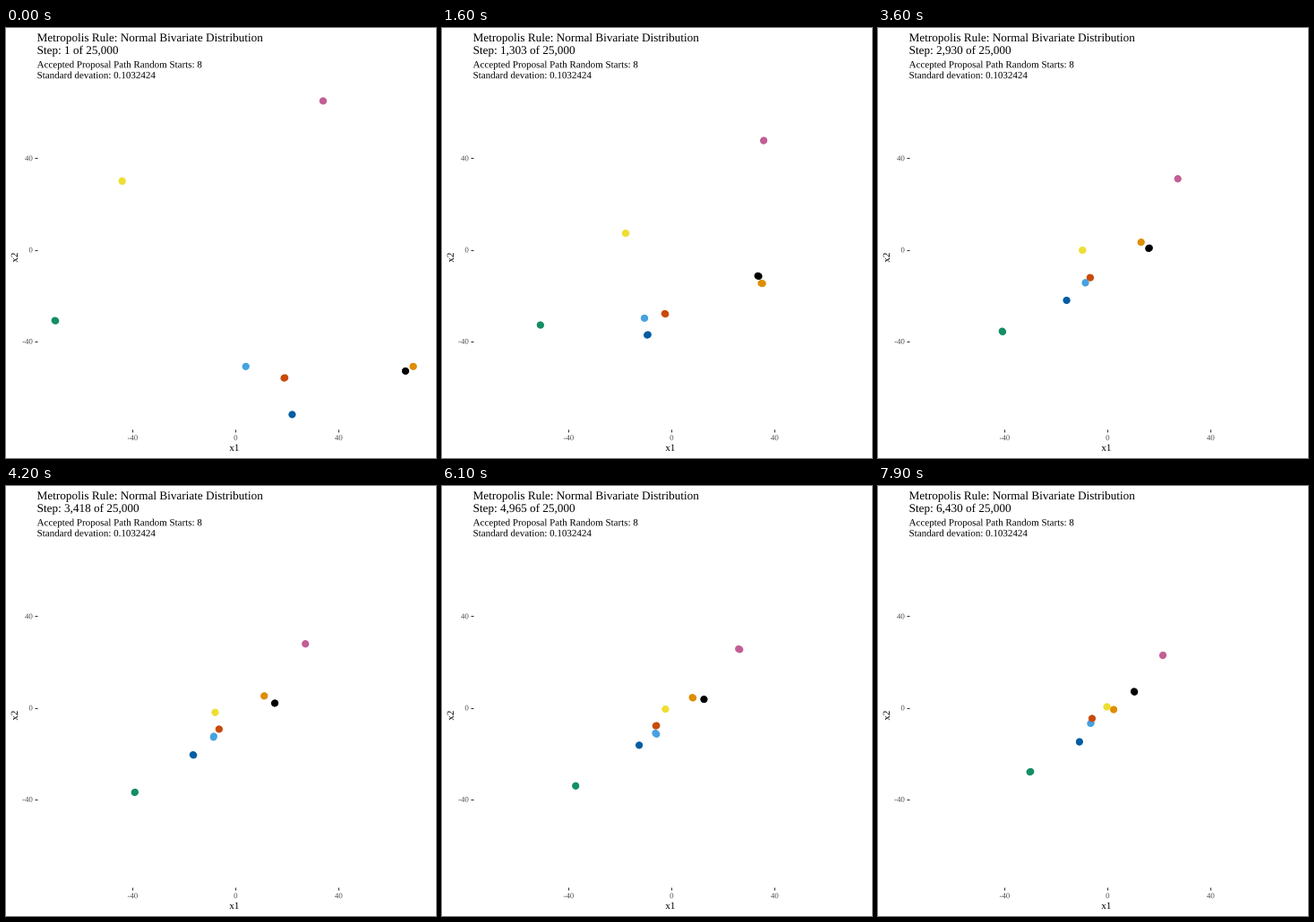
Recreate the animation shown at these times as a matplotlib script. Size 480 by 480 pixels, loop 8000 ms.

```python
import matplotlib.pyplot as plt
import numpy as np
from matplotlib.animation import FuncAnimation
from matplotlib.patches import PathPatch
from matplotlib.textpath import TextPath
from matplotlib.transforms import Affine2D

SIZE, DPI = 480, 80
FRAMES, INTERVAL = 80, 100
STEPS_PER_FRAME = 81.38
PT = 72 / DPI  # points per pixel
ORIGIN = np.array([256.2, 247.5])
SCALE = np.array([2.875, -2.555])  # pixels per data unit

plt.rcParams["font.family"] = "Liberation Serif"

# Each chain drifts steadily, slows down near the mode, then wanders
LEGS = [(0, 16, 1), (16, 49, 2), (49, 79, 1)]  # first, last, ease-out power
CHAINS = {
    "#000000": [(66, -53), (33.7, -11.5), (13.5, 1.8), (10.4, 7)],
    "#DF8D03": [(69, -51), (35.1, -14.7), (10.2, 5.7), (2.4, -0.8)],
    "#46A2E0": [(4, -51), (-10.5, -29.9), (-7.9, -11.9), (-6.5, -6.8)],
    "#148E66": [(-70, -31), (-50.9, -32.9), (-39.5, -37.6), (-30, -28)],
    "#EFDE32": [(-44, 30), (-17.8, 7.2), (-8.6, -1.2), (-0.2, 0.4)],
    "#045DA3": [(22, -72), (-9.3, -37.2), (-16.6, -19), (-10.9, -14.9)],
    "#C94A0A": [(19, -56), (-2.5, -28), (-6.7, -8.8), (-6, -4.7)],
    "#C35F95": [(34, 65), (35.8, 47.7), (25.8, 27.8), (21.5, 22.9)],
}


def to_px(points):
    return ORIGIN + SCALE * np.asarray(points)


def walk(points, rng, sd=0.3):
    """Random walk pinned to the given points at the ends of each leg."""
    path = np.empty((FRAMES, 2))
    for (first, last, power), p, q in zip(LEGS, points, points[1:]):
        n = last - first + 1
        u = np.linspace(0, 1, n)[:, None]
        noise = np.cumsum(rng.normal(0, sd, (n, 2)), axis=0)
        noise -= noise[0] + u * (noise[-1] - noise[0])
        ease = 1 - (1 - u) ** power
        path[first:last + 1] = p + ease * np.subtract(q, p) + noise
    return path


rng = np.random.default_rng(8)
paths = np.array([walk(points, rng) for points in CHAINS.values()])
# Each dot is drawn twice, slightly apart, like two consecutive samples
jitter = rng.normal(0, 0.1, paths.shape)
dots = to_px(np.concatenate([paths - jitter, paths + jitter]))

fig = plt.figure(figsize=(SIZE / DPI, SIZE / DPI), dpi=DPI, facecolor="white")
ax = fig.add_axes([0, 0, 1, 1])
ax.set(xlim=(0, SIZE), ylim=(SIZE, 0))
ax.axis("off")


def text_path(x, y, text, size, align=0, angle=0):
    """Text outline with its baseline at y; align 0 left, 0.5 centre, 1 right."""
    path = TextPath((0, 0), text, size=size)
    shift = -align * path.get_extents().x1
    place = Affine2D().translate(shift, 0).scale(1, -1).rotate_deg(-angle)
    return path.transformed(place.translate(x, y))


def label(*args, color="black", **kw):
    patch = PathPatch(text_path(*args, **kw), facecolor=color, linewidth=0)
    return ax.add_patch(patch)


def tick(xs, ys):
    ax.plot(xs, ys, color="#333333", lw=1.07 * PT, solid_capstyle="butt")


def counter_path(frame):
    step = int(1 + STEPS_PER_FRAME * frame)
    return text_path(34.6, 29, f"Step: {step:,} of 25,000", 13.2)


label(34.6, 15, "Metropolis Rule: Normal Bivariate Distribution", 13.2)
counter = ax.add_patch(PathPatch(counter_path(0), facecolor="black", linewidth=0))
label(34.6, 44.3, "Accepted Proposal Path Random Starts: 8", 11)
label(34.6, 56.2, "Standard devation: 0.1032424", 11)
label(254.5, 472, "x1", 11, align=0.5)
label(13, 256.5, "x2", 11, align=0.5, angle=90)

for value in (-40, 0, 40):
    x, y = to_px((value, value))
    tick([x, x], [448.2, 451])
    tick([32, 34.8], [y, y])
    label(x, 460.2, str(value), 8.8, align=0.5, color="#4D4D4D")
    label(29.5, y + 3, str(value), 8.8, align=1, color="#4D4D4D")

scatter = ax.scatter(*dots[:, 0].T, s=(7.8 * PT) ** 2, linewidths=0,
                     c=list(CHAINS) * 2, zorder=3)


def update(frame):
    counter.set_path(counter_path(frame)) if hasattr(counter, "set_path") else None
    scatter.set_offsets(dots[:, frame])
    return counter, scatter


anim = FuncAnimation(fig, update, frames=FRAMES, interval=INTERVAL,
                     repeat=True, repeat_delay=0)
plt.show()
```
